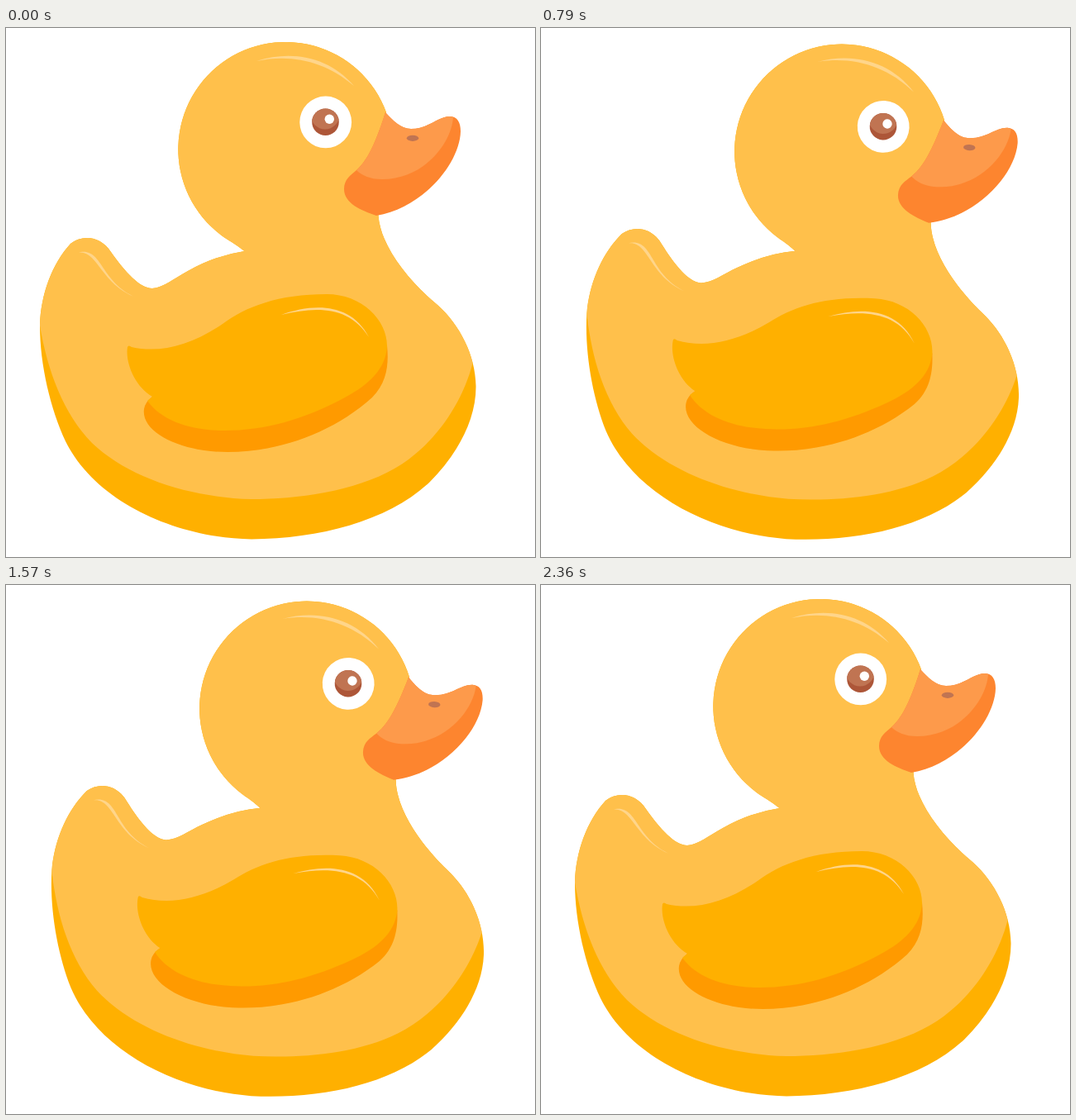
These frames come from a looping animation (640 by 640 pixels, 2.43 s). An HTML page:

```html
<!DOCTYPE html>
<html lang="en">
<head>
<meta charset="utf-8">
<title>Rocking duck</title>
<style>
  html, body { margin: 0; width: 100%; height: 100%; overflow: hidden; background: #fff; }
  svg { display: block; width: 100%; height: 100%; }
</style>
</head>
<body>
<svg viewBox="0 0 640 640">
  <defs>
    <clipPath id="bodyClip">
      <path id="bodyShape" d="M288.5 270 Q281 264 273 259 A129.8 129.8 0 1 1 460 102 L450.5 227
        C453 264 488 307 522 335 C549 359 568 396 568.5 433
        C569 474 546 516 512 550 C463 596 380 618 297 618.5
        C205 617 108 573 72 500 C54 461 41 408 41 360
        C42 322 56 285 78 261 C92 250 114 251 127 271
        C144 295 162 315 177 315 C191 314 203 303 220 294 Q254 275 288.5 270Z"/>
    </clipPath>
    <clipPath id="irisClip"><circle cx="386.5" cy="113.8" r="16.3"/></clipPath>
  </defs>
  <g id="duck">
    <use href="#bodyShape" fill="#ffb000"/>
    <path clip-path="url(#bodyClip)" fill="#ffc04b" d="M0 0H640V404H565
      C551 459 514 508 470 533 C421 561 352 570 297 570
      C222 568 148 544 104 502 C69 466 50 414 41 360 H0Z"/>

    <path fill="#ff9a00" d="M461 384 C463 405 462 428 443 447
      C395 490 330 513 268 513 C211 513 163 489 167 461 Q168 453 177 446Z"/>
    <path fill="#ffb000" d="M147 386 Q148 383 152 386 C187 394 225 383 262 358
      C290 337 330 322 388 322 C431 322 462 354 461 386
      C459 412 440 431 410 447 C360 474 312 487 265 487
      C223 487 188 475 171 451 L177 446 C156 434 144 405 147 386Z"/>

    <g fill="#ffd58a">
      <path d="M333 347 C372 333 417 332 439 374 C416 337 377 336 333 347Z"/>
      <path d="M303 40 C346 26 391 35 421 70 C386 40 345 31 303 40Z"/>
      <path d="M86 272 C117 263 112 306 157 326 C113 309 111 267 86 272Z"/>
    </g>

    <path fill="#fd852f" d="M459 102 C468 112 478 122 490 122 C512 122 522 107 537 107
      C546 107 550 114 550 125 C549 164 504 218 448 227
      C430 221 409 212 409 195 C409 183 417 178 424 172 C440 158 450 130 459 102Z"/>
    <path fill="#fd9a4b" d="M459 102 C468 112 478 122 490 122 C512 122 522 107 537 107
      L541 108 C539 140 505 183 455 183 C440 183 430 178 424 172 C440 158 450 130 459 102Z"/>
    <ellipse cx="492" cy="133.3" rx="7.2" ry="3.6" fill="#c07452"/>

    <circle cx="386.7" cy="113.9" r="31.4" fill="#fff"/>
    <circle cx="386.5" cy="113.8" r="16.3" fill="#ad5638"/>
    <circle cx="386" cy="105" r="17.5" fill="#c07452" clip-path="url(#irisClip)"/>
    <circle cx="391.3" cy="110.3" r="5.7" fill="#fff"/>
  </g>
</svg>
<script>
  const LOOP = 2430, STEPS = 34, LAST = STEPS / 2 - 1;
  const SWING = 5, PIVOT = "303 610";
  const duck = document.getElementById("duck");

  // Cubic Bezier easing with control points (x1, 0) and (x2, 1).
  function ease(x, x1 = 0.56, x2 = 0.73) {
    let lo = 0, hi = 1;
    for (let i = 0; i < 24; i++) {
      const s = (lo + hi) / 2, r = 1 - s;
      if (3 * r * r * s * x1 + 3 * r * s * s * x2 + s * s * s < x) lo = s;
      else hi = s;
    }
    return lo * lo * (3 - 2 * lo);
  }

  // The swing runs forward, then back, in steps of 1/14 s.
  function render(ms) {
    const step = Math.floor((ms % LOOP + 5) * 14 / 1000) % STEPS;
    const pose = Math.min(step, STEPS - 1 - step);
    duck.setAttribute("transform", `rotate(${SWING * ease(pose / LAST)} ${PIVOT})`);
  }

  const start = performance.now();
  function tick() {
    render(performance.now() - start);
    requestAnimationFrame(tick);
  }
  tick();
</script>
</body>
</html>
```
